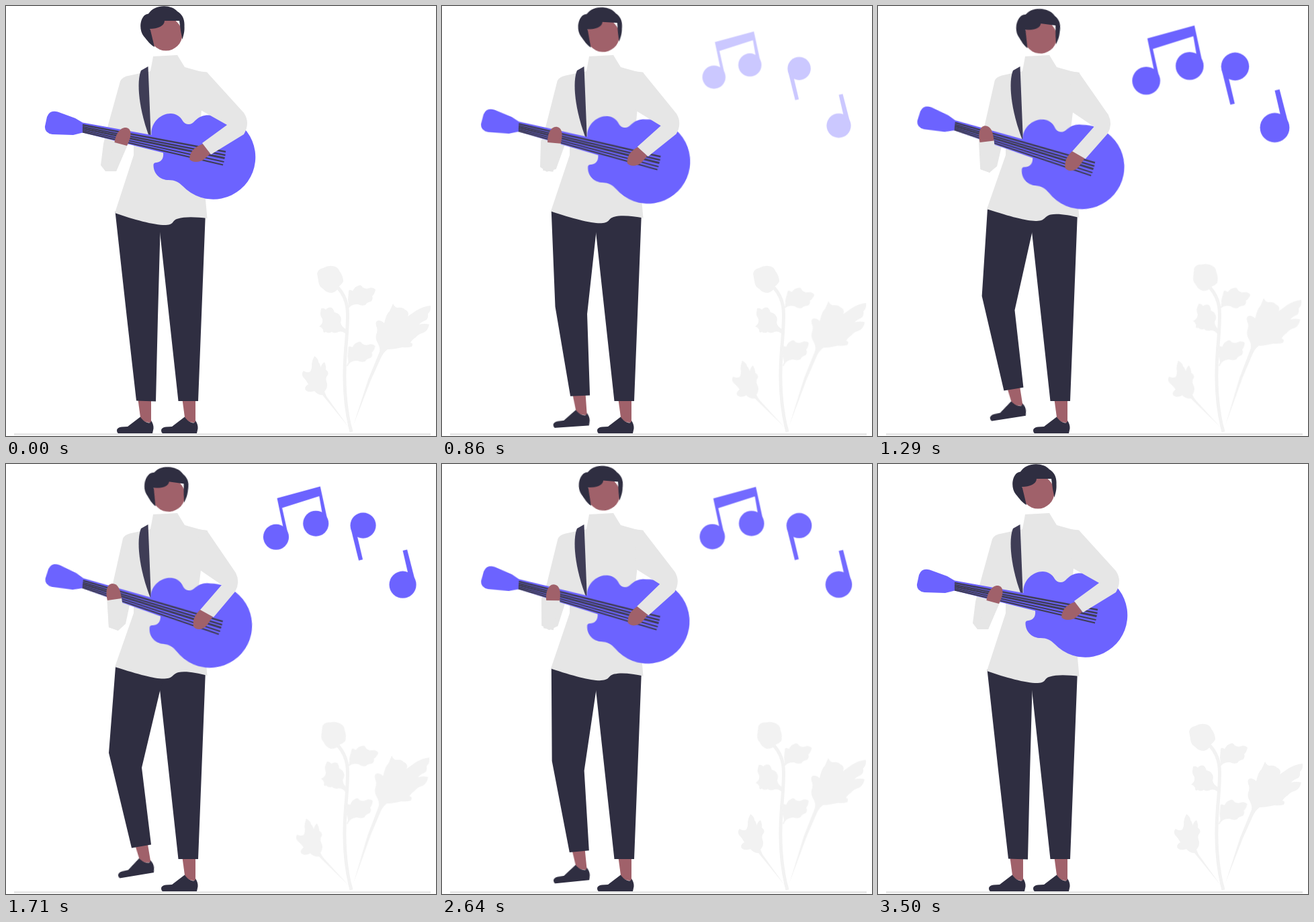
An HTML page without scripts that plays this animation: 640x640 px, repeating every 3570 ms.

```html
<!DOCTYPE html>
<html lang="en">
<head>
<meta charset="utf-8">
<title>Guitar player</title>
<style>
html, body { margin: 0; height: 100%; overflow: hidden; background: #fff; }
svg { display: block; width: 100%; height: 100%; }

.skin { fill: #a0616a; }
.dark { fill: #2f2e41; }
.knit { fill: #e6e6e6; }
.plant { fill: #f2f2f2; }
.note, #guitar { fill: #6c63ff; }

/* every part shares one loop and one easing */
.move { animation: 3.57s cubic-bezier(.8, 0, .2, 1) infinite both; }

/* player: rest pose is in the markup, lean pose is at 50% */
#head { animation-name: head; transform-origin: 238px 35px; }
#guitar { animation-name: guitar; transform-origin: 150px 182px; }
#step { animation-name: step; transform-origin: 218px 636px; }
#leg { animation-name: leg; }
#torso { animation-name: torso; }
#armL { animation-name: armL; }
#foreL { animation-name: foreL; }
#handL { animation-name: handL; }
#armR { animation-name: armR; }
#handR { animation-name: handR; }

@keyframes head { 50% { transform: translate(5px, 4.5px) rotate(8deg); } }
@keyframes guitar { 50% { transform: rotate(5.7deg); } }
@keyframes step { 50% { transform: translate(2px, -28px) rotate(-9.5deg); } }
@keyframes leg { 50% { d: path("M163 302L153 430L187 571.5L216 566.5L202 452L229.5 336L240 304Z"); } }
@keyframes torso { 50% { d: path("M219 75L255 73L266 91L291 98L300 99L290 158L286 190L297 285L299.5 315C285 311 268 308 257 310C246 313 250 319 236 319.5C222 320 200 314 162 302L190 222L190 140L196 102L215 97Z"); } }
@keyframes armL { 50% { d: path("M200 100L184 103.5Q176 106 174 111L159 178L150 197L153 243L167 248L178 238L184 210L200 190Z"); } }
@keyframes foreL { 50% { d: path("M151 202L172 199L173 206L167 248L153 243Z"); } }
@keyframes handL { 50% { d: path("M151 203C148 192 149 179 158 178C167 178 170 187 172 200Z"); } }
@keyframes armR { 50% { d: path("M286 97L299 99L342 162Q349 176 341 190L309 228L289 217L321 180L289 158Z"); } }
@keyframes handR { 50% { d: path("M290 216C283 222 277 231 279 242C284 249 294 246 299 240L308 227Z"); } }

/* leaves: same swing, each with its own timing */
#leafA { --to: rotate(-6.7deg); animation-name: swayA; transform-origin: 512px 628px; }
#leafB { --to: rotate(10deg); animation-name: swayB; transform-origin: 508px 450px; }
#leafC { --to: rotate(-7deg); animation-name: swayC; transform-origin: 508px 450px; }
#leafD { --to: rotate(13deg); animation-name: swayD; transform-origin: 505px 485px; }
#bud { --to: rotate(17deg); animation-name: swayE; transform-origin: 495px 421px; }
#leafF { --to: rotate(-.6deg) scale(1, 1.045); animation-name: swayF; transform-origin: 517px 624px; }

@keyframes swayA { 22%, 49% { transform: var(--to); } 0%, 69.5%, to { transform: none; } }
@keyframes swayB { 22%, 60% { transform: var(--to); } 0%, 80%, to { transform: none; } }
@keyframes swayC { 22%, 70% { transform: var(--to); } 0%, 98%, to { transform: none; } }
@keyframes swayD { 41%, 64% { transform: var(--to); } 0%, 22%, 82%, to { transform: none; } }
@keyframes swayE { 41%, 70% { transform: var(--to); } 0%, 22%, 98%, to { transform: none; } }
@keyframes swayF { 50% { transform: var(--to); } }

/* notes pop in one after another */
.note { animation-name: pop; transform-box: fill-box; transform-origin: center; }
.note:nth-of-type(2) { animation-delay: .215s; }
.note:nth-of-type(3) { animation-delay: .43s; }
@keyframes pop {
  0%, 18.5%, 82.9%, to { opacity: 0; transform: scale(.8); }
  30.5% { opacity: 1; transform: scale(1.1); }
  53%, 70.9% { opacity: 1; transform: scale(1); }
}
</style>
</head>
<body>
<svg viewBox="0 0 640 640">
  <defs>
    <g id="foot">
      <path class="skin" d="M195 575L200 612Q204 621 216 620V575Z"/>
      <path class="dark" d="M167 636Q165 635 165 631Q166 627 172 626.500L181 626L200 611.500Q204 618 210 620Q216 621.500 216 617Q220 623 219.500 629L218 636Z"/>
    </g>
    <path id="leaf" d="M507 452L510 446L509 437L510 424Q511 421 516 424Q519 418 523 417Q528 413 531 419Q536 422 540 420Q546 418 550 422Q549 428 545 432Q547 437 543 440Q537 441 535 445Q529 447 524 444Q513 443 509 452Z"/>
  </defs>

  <g class="plant">
    <path d="M514 634C502 590 502 545 506.500 500C510 455 511 438 494 419" fill="none" stroke="#f2f2f2" stroke-width="5"/>
    <path id="bud" class="move" d="M463 398Q465 391 472 390Q479 386 486 387Q494 388 496 394Q502 402 502 410Q500 414 496 417Q493 425 485 427Q477 427 472 421Q466 418 465 410Z"/>
    <g id="leafB" class="move"><use href="#leaf"/></g>
    <g transform="translate(-.5 84)"><g id="leafC" class="move"><use href="#leaf"/></g></g>
    <path id="leafD" class="move" d="M469 450Q473 449 476 452Q480 447 485 449Q488 452 489 456Q495 457 497 461Q500 465 498 471Q499 477 506 481V488Q500 483 495 485Q489 488 485 485Q480 488 476 485Q472 488 472 482Q470 478 466 477Q472 473 471 466Q467 460 468 457Z"/>
    <path id="leafA" class="move" d="M459 521Q465 525 465 530Q468 533 468 538Q471 531 474 530Q477 536 476 541Q481 545 479 549Q475 553 477 559Q480 567 474 574L477 581L510 627L471 579Q464 579 459 573Q451 576 446 572Q443 567 450 563Q446 556 442 552Q439 546 443 543Q449 547 453 544Q456 538 455 533Q456 526 459 521Z"/>
    <path id="leafF" class="move" d="M576 443Q579 449 583 449Q590 448 594 452Q601 455 598 462Q605 457 611 453Q621 447 632 446Q633 454 628 458Q629 466 624 468Q617 471 615 474Q623 472 630 474Q628 483 622 486Q614 488 610 493Q604 497 602 501Q607 502 604 507Q597 509 590 508Q577 511 568 511Q561 516 557 526L543 557L517 624L539 556L555 517Q558 511 554 503Q549 495 551 489Q554 482 551 476Q549 469 554 468Q559 468 563 472Q566 458 571 454Z"/>
  </g>
  <rect class="knit" x="12" y="636" width="620" height="2.800"/>

  <use href="#foot" x="66"/>
  <g id="step" class="move"><use href="#foot"/></g>
  <path class="dark" d="M200 306H297L291 460L286 588H256.500L229 336Z"/>
  <path id="leg" class="move dark" d="M162.500 306L179.500 460L194 587.500L223 588.500L226 463L229.500 336L240 304Z"/>

  <path id="armL" class="move knit" d="M200 100L184 103.500Q173 105 170 112L152 177L145 205L141 237L148 246L164 246L181 207L200 190Z"/>
  <path id="torso" class="move knit" d="M219 75L255 73L266 91L291 98L300 99L291 155L288 190L297 288L299.500 316C285 314 266 313 256 316.500C246 319 252 325 238 326C222 326.500 190 318 162 308L190 222L190 140L196 102L215 97Z"/>
  <path d="M211.500 90L201 96C194 112 197 155 216 202Z" fill="#3f3d56"/>

  <g id="guitar" class="move">
    <path d="M114 173.500L216.500 192C215 174 230 160 245 160C253 160 259 164 263 171Q266 176 272 176Q277 176 281 171C288 164 295 162 303 162.500A62.700 62.700 0 1 1 263 268C257 262 251 259 242 259C229 259 219 249 219.500 236Q220 233 224 233C231 232 235 227 234 218.500L114 188.500L100 192L69 191Q57 189 58 179L61 165Q65 154 77 157.500L103 167Z"/>
    <path d="M114 177L327 217M114 179.800L326.500 222M114 185L324.500 232M114 187.300L323 236.500" stroke="#3f3d56" stroke-width="2.300"/>
    <path d="M114 182.400L325.500 226.500" stroke="#3f3d56" stroke-width="3"/>
  </g>

  <path id="foreL" class="move knit" d="M162 202.500L180 207L179 210L164 246L148 246Z"/>
  <path id="handL" class="move skin" d="M161.500 203C163 191 170 180 179 181C187 183 188 192 180 208Z"/>
  <path id="handR" class="move skin" d="M294 205C284 208 274 214 273 228C277 234 290 233 296 227L304 220Z"/>
  <path id="armR" class="move knit" d="M286 97L299 98.500L354 159Q364 174 354 191L305 221L292 204L329 177L289 154.500Z"/>

  <g id="head" class="move">
    <circle class="skin" cx="238" cy="42" r="24.500"/>
    <path class="dark" d="M221 61C214 57 211 52 205 45C198 36 199 21 206 14Q208 12 212 11.500C221 -3 246 -3 255 8C263 13 266 20 265.500 30C266 39 264 44 262.500 50L260 37L258 22L236 22C236 30 225 34 214.500 34Z"/>
  </g>

  <g class="move note">
    <path d="M403.500 51L467.500 33.500L478 82L472 83L466 48L411 65.500L419 101L414 101Z"/>
    <circle cx="402" cy="108.500" r="19"/>
    <circle cx="461" cy="88.500" r="19"/>
  </g>
  <g class="move note">
    <path d="M513 95L525 143.500L531 142L522 104Z"/>
    <circle cx="531.500" cy="91.500" r="19"/>
  </g>
  <g class="move note">
    <path d="M590.500 129L597 127.500L609 174L600 170Z"/>
    <circle cx="590.500" cy="179.500" r="20"/>
  </g>
</svg>
</body>
</html>
```
